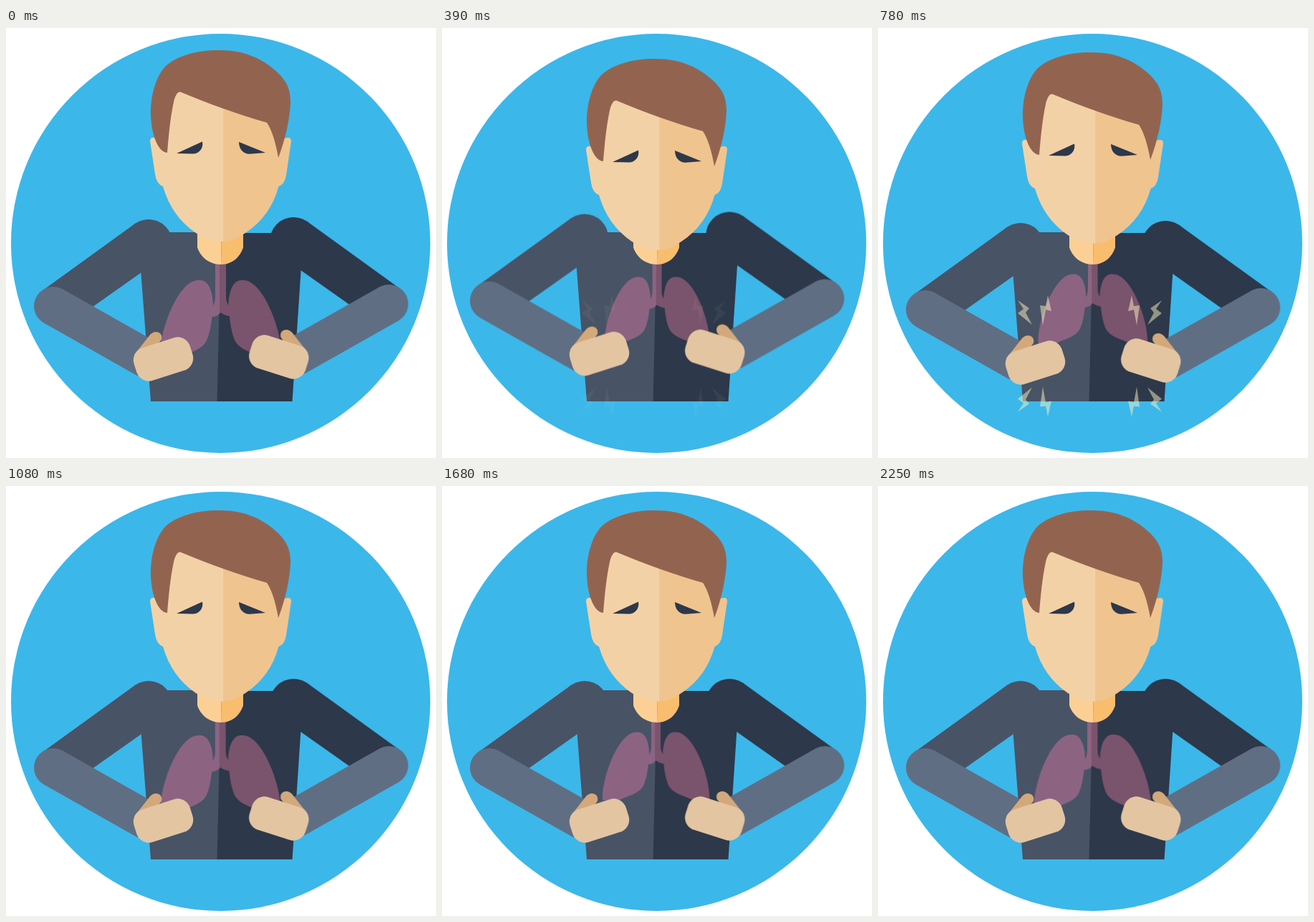
Write an HTML page without scripts that moves like this. It is 600x600 px and loops after 2450 ms.

```html
<!DOCTYPE html>
<html lang="en">
<head>
<meta charset="utf-8">
<title>Chest pain</title>
<style>
  html, body { margin: 0; width: 100%; height: 100%; overflow: hidden; background: #fff; }
  svg { display: block; width: 100%; height: 100%; }

  .sleeve-left { color: #485366; }
  .sleeve-right { color: #2d384a; }
  .lung-left { color: #8c6482; }
  .lung-right { color: #7a536d; }

  .head, .arms, .lungs, .bolts { animation: 2450ms infinite; }
  .head { animation-name: nod; }
  .arms { animation-name: shrug; }
  .lungs { animation-name: breathe; transform-origin: 299.5px 352px; }
  .bolts { animation-name: flash; animation-timing-function: ease-in-out; }

  @keyframes nod {
    0% { transform: translateY(-3px); animation-timing-function: ease-out; }
    9.8% { transform: translateY(10px); animation-timing-function: linear; }
    22.04% { transform: translateY(8px); animation-timing-function: ease-out; }
    31%, 100% { transform: none; }
  }
  @keyframes shrug {
    0% { transform: translateY(-5px); animation-timing-function: ease-out; }
    9.8% { transform: translateY(-15px); animation-timing-function: ease-in; }
    22.04% { transform: translateY(-7px); animation-timing-function: ease-out; }
    31%, 100% { transform: none; }
  }
  @keyframes breathe {
    0% { transform: none; animation-timing-function: ease-in-out; }
    9.8% { transform: translate(.5px, -1px) scale(.78); animation-timing-function: ease-in-out; }
    22.04% { transform: translate(.5px, -8px) scale(.945); animation-timing-function: ease-in-out; }
    31.84% { transform: translate(.2px, -8.5px) scale(.9); animation-timing-function: ease-in-out; }
    43.5% { transform: translate(-.3px, -4px) scale(.99); animation-timing-function: ease-in; }
    57.55% { transform: translate(-1px, -7px) scale(.915); animation-timing-function: ease-out; }
    69% { transform: translate(-1px, -8.5px) scale(.88); animation-timing-function: ease-in; }
    80.82% { transform: translate(-1px, -6.5px) scale(.91); animation-timing-function: ease-out; }
    91.84%, 100% { transform: translate(-.3px, -5px) scale(.965); }
  }
  @keyframes flash {
    0% { opacity: 0; }
    7.35%, 9.8% { opacity: 1; }
    17.14% { opacity: 0; }
    26.94% { opacity: 1; }
    36.73%, 100% { opacity: 0; }
  }
</style>
</head>
<body>
<svg viewBox="0 0 600 600">
  <defs>
    <g id="arm">
      <g fill="currentColor">
        <circle cx="199" cy="305" r="33"/>
        <path d="M180 278L50 372L66 393L121 394L189 346L215 328Z"/>
      </g>
      <path d="M66 393H66" stroke="#606e83" stroke-width="54" stroke-linecap="round"/>
      <path d="M66 393L197 467" stroke="#606e83" stroke-width="54"/>
      <path d="M179 461L201 433Q208 426 215 431Q219 436 216 441L198 462Z" fill="#d3a97b"/>
      <rect x="-41" y="-24" width="82" height="48" rx="18" transform="translate(219.5 467) rotate(-17.7)" fill="#e3c5a2"/>
    </g>
    <path id="lung" fill="currentColor" d="M268 352C282 350 288 366 289 385C288 400 286 425 279 438C272 449 258 452 240 460H215C213 425 240 352 268 352Z"/>
    <g id="bolt-pair">
      <path d="M195 380L211 391L206 397L215 414L195 398L203 392Z"/>
      <path d="M237 373L242 395L234 393L230 415L226 387L234 388Z"/>
    </g>
    <g id="bolt-side">
      <use href="#bolt-pair"/>
      <use href="#bolt-pair" transform="matrix(1 0 0 -1 0 915.5)"/>
    </g>
  </defs>

  <circle cx="299.5" cy="300.5" r="292.5" fill="#3cb7ea"/>

  <path d="M184 285H301L295 521H202Z" fill="#485366"/>
  <path d="M300 286H415L399.5 521H294.5Z" fill="#2d384a"/>

  <g class="lungs">
    <use href="#lung" class="lung-left"/>
    <use href="#lung" class="lung-right" transform="matrix(-1 0 0 1 599.4 0)"/>
    <path d="M292 300V374Q292 386 287 389V403Q295 403 299 397V300Z" fill="#8c6482"/>
    <path d="M298 300H307V374Q307 384 312 388V402Q304 401 298 396Z" fill="#7a536d"/>
  </g>

  <path d="M267 275H301L300 330C283 330 271 319 267 306Z" fill="#fcd095"/>
  <path d="M301 275H331V306C327 319 316 330 300 330Z" fill="#f9bd6e"/>

  <g class="arms">
    <use href="#arm" class="sleeve-left"/>
    <use href="#arm" class="sleeve-right" transform="matrix(-1 0 0 1 600.3 -3)"/>
  </g>

  <g class="head">
    <path d="M303 95L215 90L210 157Q201 154 201 161L208 207Q210 221 219 224Q231 266 265 289Q282 300 303 301Z" fill="#f3d1a6"/>
    <path d="M303 95V301Q318 300 334 289Q369 266 380.500 224Q389 221 391 208L398 161Q398 154 389 157L385 120Z" fill="#f0c48f"/>
    <path d="M225 177C211 176 202 148 202 121C202 95 210 70 222 57C238 42 265 34 297 34C335 34 360 47 380 66C392 78 397 89 397 107C396 130 390 158 380 184Q374 150 364 135C325 124 283 109 244 92.500C239 91 236 98 234 106C229 130 227 153 225 177Z" fill="#926450"/>
    <g fill="#2d384a">
      <path d="M238 178L274 161.500C276 171 269 179 260 178.500Z"/>
      <path d="M362 177L325 162C325 172 331 179 340 178.800Z"/>
    </g>
  </g>

  <g class="bolts" fill="#fff6bf">
    <use href="#bolt-side"/>
    <use href="#bolt-side" transform="matrix(-1 0 0 1 591 0)"/>
  </g>
</svg>
</body>
</html>
```
